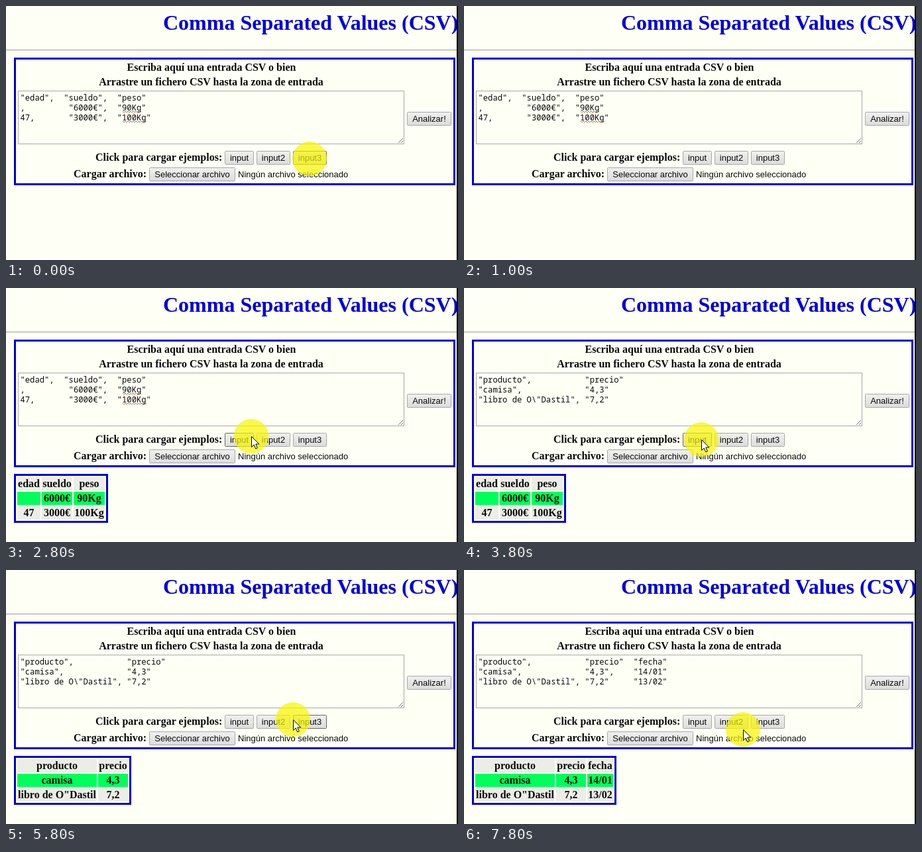
These frames come from a looping animation (682 px wide and 384 px high, 8000 ms). An HTML page:

```html
<!DOCTYPE html>
<html lang="es">
<head>
<meta charset="utf-8">
<title>Comma Separated Values</title>
<style>
  html, body { margin: 0; width: 100%; height: 100%; overflow: hidden; background: #fefff5; }
  svg { display: block; width: 100vw; height: 100vh; }
  text { white-space: pre; fill: #0a0a0a; }
  .serif { font: bold 16px "Liberation Serif", "Times New Roman", serif; }
  .title { font-size: 32px; fill: #0000dc; }
  .sans { font: 13px "Liberation Sans", Arial, sans-serif; }
  .mono { font: 12.2px "Noto Sans Mono", monospace; }
  .mid { text-anchor: middle; }
  .frame { fill: none; stroke: #0000cd; stroke-width: 3; }
  .btn { fill: url(#face); stroke: #a8a8a8; }
  .btn.hover { stroke: #666; }
</style>
</head>
<body>
<svg id="stage" viewBox="0 0 682 384">
  <defs>
    <linearGradient id="face" x2="0" y2="1">
      <stop offset="0" stop-color="#f0f0ee"/>
      <stop offset="1" stop-color="#dcdcda"/>
    </linearGradient>
  </defs>
  <rect width="682" height="384" fill="#fefff5"/>
  <text class="serif title" x="237" y="36">Comma Separated Values (CSV)</text>
  <path d="M0 66.5H680" stroke="#9c9c94"/>
  <rect class="frame" x="13.5" y="79.5" width="663" height="190"/>
  <text class="serif mid" x="310" y="98">Escriba aquí una entrada CSV o bien</text>
  <text class="serif mid" x="309.5" y="120">Arrastre un fichero CSV hasta la zona de entrada</text>
  <rect x="18.5" y="128.5" width="582" height="80" fill="#fefff5" stroke="#a9a9a4"/>
  <path d="M592 207l7-7M596 207l3-3" stroke="#777"/>
  <g id="input"></g>
  <text class="serif" x="135" y="234">Click para cargar ejemplos:</text>
  <text class="serif" x="102" y="259">Cargar archivo:</text>
  <text class="sans" x="350" y="259">Ningún archivo seleccionado</text>
  <g id="buttons"></g>
  <g id="table"></g>
  <path d="M681 0V384" stroke="#000" stroke-width="2"/>
  <g id="pointer">
    <circle r="26" fill="#f8f600" fill-opacity=".7"/>
    <path id="arrow" d="M.5 .5V16.5L4.2 13L6.8 19L9.4 17.9L6.8 12H11.8Z" fill="#fff" stroke="#000"/>
  </g>
</svg>
<script>
const LOOP = 8000, STEP = 200;
const $ = id => document.getElementById(id);

function add(parent, tag, attrs, content = "") {
  const el = document.createElementNS("http://www.w3.org/2000/svg", tag);
  for (const k in attrs) el.setAttribute(k, attrs[k]);
  el.textContent = content;
  parent.appendChild(el);
  return el;
}

const buttons = [
  ["input", 330, 219, 44],
  ["input2", 378, 219, 51],
  ["input3", 433, 219, 51],
  ["Analizar!", 605, 160, 67],
  ["Seleccionar archivo", 216, 244, 130]
].map(([label, x, y, w]) => {
  const el = add($("buttons"), "rect", { class: "btn", x: x + .5, y: y + .5, width: w - 1, height: 20, rx: 1 });
  add($("buttons"), "text", { class: "sans mid", x: x + w / 2, y: y + 15 }, label);
  return { el, x, y, w };
});

const inputs = [
  [0, ['"edad",  "sueldo",  "peso"', ',         "6000€",  "90Kg"', '47,       "3000€",  "100Kg"'], true],
  [3200, ['"producto",           "precio"', '"camisa",             "4,3"', '"libro de O\\"Dastil", "7,2"']],
  [6200, ['"producto",           "precio"  "fecha"', '"camisa",             "4,3",    "14/01"', '"libro de O\\"Dastil", "7,2"     "13/02"']]
];

const products = [["producto", "precio"], ["camisa", "4,3"], ['libro de O"Dastil', "7,2"]];
const dates = ["fecha", "14/01", "13/02"];
const tables = [
  [0],
  [2000, [35, 46, 47], [["edad", "sueldo", "peso"], ["", "6000€", "90Kg"], ["47", "3000€", "100Kg"]]],
  [5200, [120, 45], products],
  [7400, [120, 45, 39], products.map((row, i) => [...row, dates[i]])]
];

// Pointer stops: time, x, y
const path = [
  [0, 458, 231], [1200, 458, 231], [1800, 622, 172], [2200, 622, 172],
  [2800, 370, 224], [3200, 358, 229], [3800, 358, 229], [4800, 620, 187],
  [5000, 621, 177], [5200, 621, 177], [5800, 433, 226], [6000, 472, 224],
  [6800, 476, 222], [7200, 622, 171], [7400, 622, 171], [7800, 421, 241]
];

function squiggle(x, y, n) {
  const d = `M${x} ${y}` + Array.from({ length: n }, (_, i) => `l2 ${i % 2 ? -2 : 2}`).join("");
  add($("input"), "path", { d, fill: "none", stroke: "#e05030", "stroke-width": .9 });
}

function drawInput([, lines, misspelt]) {
  $("input").replaceChildren();
  lines.forEach((s, i) => add($("input"), "text", { class: "mono", x: 21.5, y: 143 + i * 15 }, s));
  if (misspelt) {
    squiggle(176, 159, 14);
    squiggle(176, 174, 18);
  }
}

function drawTable([, widths, rows]) {
  const g = $("table");
  g.replaceChildren();
  if (!rows) return;
  let x = 17;
  widths.forEach((w, c) => {
    rows.forEach((row, r) => {
      const y = 286 + r * 22;
      add(g, "rect", { x, y, width: w, height: 20, fill: r === 1 ? "#00ff5a" : "#ebede6" });
      add(g, "text", { class: "serif mid", x: x + w / 2, y: y + 15 }, row[c]);
    });
    x += w + 2;
  });
  add(g, "rect", { class: "frame", x: 13.5, y: 282.5, width: x - 12, height: 71 });
}

function pointerAt(t) {
  const i = path.findIndex(p => p[0] > t);
  if (i < 0) return path.at(-1).slice(1);
  const [t0, x0, y0] = path[i - 1], [t1, x1, y1] = path[i];
  const u = (t - t0) / (t1 - t0), k = u * u * (3 - 2 * u);
  return [x0 + (x1 - x0) * k, y0 + (y1 - y0) * k];
}

const current = (list, t) => list.findLast(s => s[0] <= t);
let input, table;

function render(time) {
  const t = Math.floor((time % LOOP) / STEP) * STEP;
  const nextInput = current(inputs, t), nextTable = current(tables, t);
  if (nextInput !== input) drawInput(input = nextInput);
  if (nextTable !== table) drawTable(table = nextTable);

  const [x, y] = pointerAt(t);
  const hidden = t >= 200 && t < 1400;
  $("pointer").setAttribute("transform", `translate(${x} ${y})`);
  $("pointer").setAttribute("visibility", hidden ? "hidden" : "visible");
  $("arrow").setAttribute("opacity", t < 200 ? 0 : 1);
  for (const b of buttons) {
    const over = !hidden && x >= b.x && x < b.x + b.w && y >= b.y && y < b.y + 21;
    b.el.classList.toggle("hover", over);
  }
}

const start = performance.now();
function tick() {
  render(performance.now() - start);
  requestAnimationFrame(tick);
}
tick();
</script>
</body>
</html>
```
